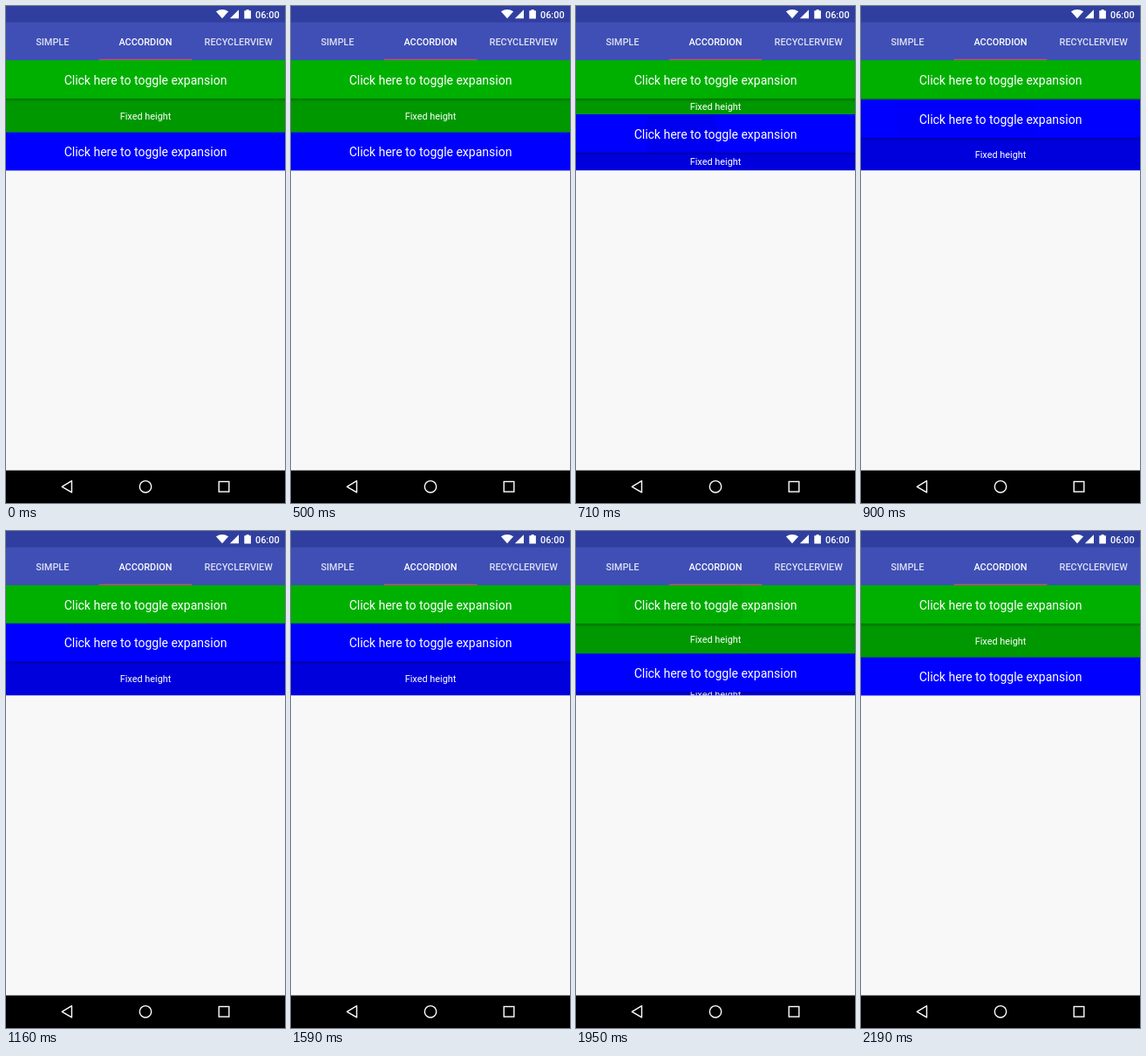
Animation, 320 px wide and 569 px high, one loop 2540 ms. Source, as an HTML page:

```html
<!DOCTYPE html>
<html lang="en">
<head>
<meta charset="utf-8">
<title>Accordion</title>
<style>
  html, body { margin: 0; width: 100%; height: 100%; overflow: hidden; background: #f8f8f9; }
  #stage { display: block; width: 100vw; height: 100vh; }
  text { font: 10.89px Roboto, sans-serif; fill: #fff; text-anchor: middle; }
  .tab, .clock { font-weight: 500; }
  .idle { fill-opacity: .83; }
  .title { font-size: 14px; }
</style>
</head>
<body>
<svg id="stage" viewBox="0 0 320 569">
  <defs>
    <linearGradient id="shade" x2="0" y2="1">
      <stop stop-opacity=".27"/>
      <stop offset="1" stop-opacity="0"/>
    </linearGradient>
  </defs>
  <rect width="320" height="569" fill="#f8f8f9"/>

  <rect width="320" height="63" fill="#3f4fb5"/>
  <rect width="320" height="18.67" fill="#303f9f"/>
  <g fill="#fff">
    <path d="M248 14.3L240.9 6.2Q248 1.8 255.1 6.2Z"/>
    <path d="M256.8 14.3H267V4.2Z"/>
    <path d="M273.3 14.4V5.2H275.6V4H278.6V5.2H280.9V14.4Z"/>
  </g>
  <text class="clock" x="299.8" y="13.6">06:00</text>
  <text class="tab idle" x="53.3" y="45">SIMPLE</text>
  <text class="tab" x="160" y="45">ACCORDION</text>
  <text class="tab idle" x="266.7" y="45">RECYCLERVIEW</text>
  <rect x="106.67" y="60.7" width="106.67" height="1.6" fill="#d0487f"/>

  <!-- backs the first panel's body, so no seam shows where the second slides over it -->
  <rect y="62.2" width="320" height="100" fill="#009800"/>
  <g id="panels"></g>

  <rect y="531.67" width="320" height="38"/>
  <g fill="none" stroke="#fff" stroke-width="1.4">
    <path d="M64.2 550.3L75.4 543.7V556.9Z" stroke-linejoin="round"/>
    <circle cx="160" cy="550.3" r="6.7"/>
    <rect x="244.2" y="544.5" width="11.6" height="11.6"/>
  </g>
</svg>
<script>
const LOOP = 2540, TOP = 62.2, HEADER = 43.56, BODY = 38.9;
const DURATION = 485, RIPPLE = 500;

const panelMarkup = (headColor, bodyColor) => `
  <g>
    <rect class="fill" y="${HEADER - 1}" width="320" fill="${bodyColor}"/>
    <svg class="body" y="${HEADER}" width="320">
      <text x="160">Fixed height</text>
      <rect width="320" height="4" fill="url(#shade)"/>
    </svg>
    <rect width="320" height="${HEADER}" fill="${headColor}"/>
    <svg width="320" height="${HEADER}"><circle class="ripple" cx="120" cy="22"/></svg>
    <text class="title" x="160" y="27.7">Click here to toggle expansion</text>
  </g>`;

const holder = document.getElementById('panels');
holder.innerHTML = panelMarkup('#00b000', '#009800') + panelMarkup('#00f', '#00d');
const [green, blue] = holder.children;
const clamp = v => Math.min(1, Math.max(0, v));

// cubic-bezier(.4, 0, .2, 1)
function fastOutSlowIn(x) {
  let lo = 0, hi = 1;
  for (let i = 0; i < 24; i++) {
    const u = (lo + hi) / 2, v = 1 - u;
    if (1.2 * v * v * u + .6 * v * u * u + u ** 3 < x) lo = u; else hi = u;
  }
  return lo * lo * (3 - 2 * lo);
}

function place(panel, y, height) {
  const find = selector => panel.querySelector(selector);
  panel.setAttribute('transform', `translate(0 ${y})`);
  find('.fill').setAttribute('height', height + 1);
  find('.body').setAttribute('height', height);
  find('.body text').setAttribute('y', height / 2 + 4.6);
  find('.body text').style.display = height > 2 ? '' : 'none';
}

function touch(panel, elapsed) {
  const age = clamp(elapsed / RIPPLE), ripple = panel.querySelector('.ripple');
  ripple.setAttribute('r', 100 * age);
  ripple.setAttribute('fill-opacity', .1 * (1 - age));
}

function render(t) {
  const progress = start => fastOutSlowIn(clamp((t - start) / DURATION));
  const open = BODY * (1 - progress(535) + progress(1652));
  place(green, TOP, open);
  place(blue, TOP + HEADER + open, BODY - open);
  touch(blue, t - 500);
  touch(green, t - 1590);
}

const begin = performance.now();
function tick() {
  render((performance.now() - begin) % LOOP);
  requestAnimationFrame(tick);
}
tick();
</script>
</body>
</html>
```
